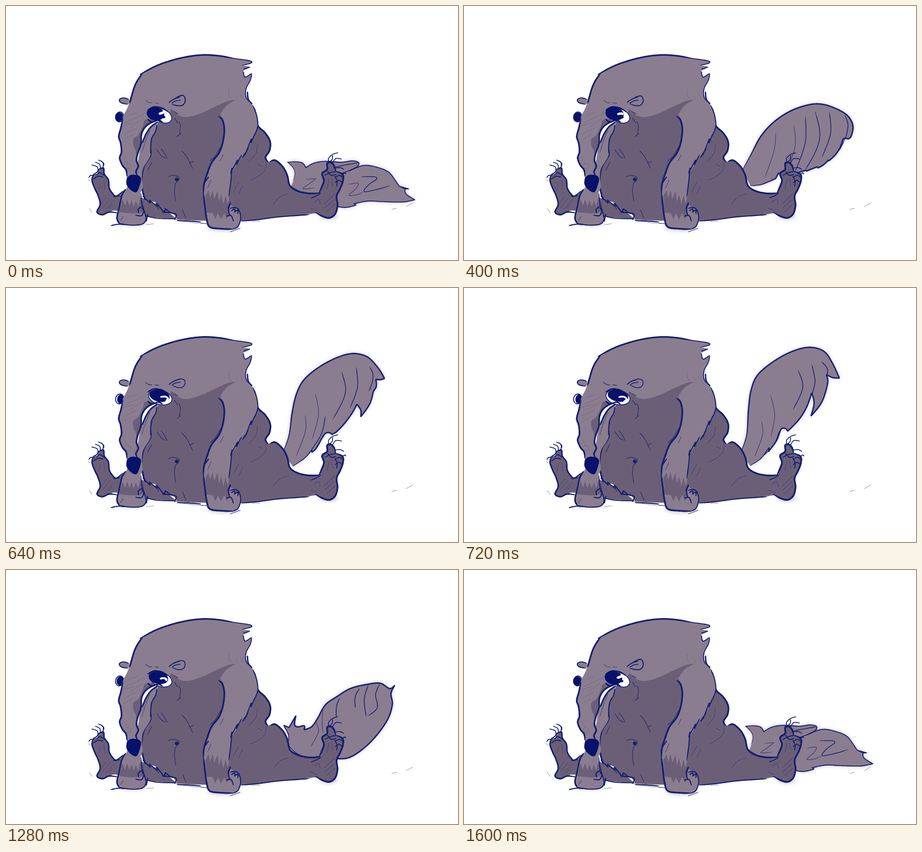
An HTML page with a canvas for the animation above (1.84 s loop, 998 by 561 pixels).

```html
<!DOCTYPE html>
<html lang="en">
<head>
<meta charset="utf-8">
<title>Tail swish</title>
<style>
html, body { margin: 0; width: 100%; height: 100%; overflow: hidden; background: #fff; }
canvas { display: block; width: 100%; height: 100%; }
</style>
</head>
<body>
<canvas id="stage" width="998" height="561"></canvas>
<script>
const ctx = document.getElementById('stage').getContext('2d');
const LIGHT = '#8b7d90', DARK = '#6b5f78', INK = '#14206f', NAVY = '#06126c', SOFT = '#4a4678';
const LOOP = 1840;
const mix = (a, b, t) => a + (b - a) * t;

// Smooth line through "x,y x,y ..."; a bar marks a sharp corner.
function trace(text) {
  const out = [];
  let last = null;
  for (const part of text.split('|')) {
    const p = part.trim().split(/\s+/).map(s => s.split(',').map(Number));
    if (last) p.unshift(last);
    for (let i = 0; i < p.length - 1; i++) {
      const a = p[i - 1] || p[i], b = p[i], c = p[i + 1], d = p[i + 2] || c;
      for (let k = 0; k < 8; k++) {
        const t = k / 8;
        out.push([0, 1].map(n => b[n] + 0.5 * t * (c[n] - a[n] +
          t * (2 * a[n] - 5 * b[n] + 4 * c[n] - d[n] + t * (3 * (b[n] - c[n]) + d[n] - a[n])))));
      }
    }
    last = p[p.length - 1];
  }
  out.push(last);
  return out;
}

// Evenly spaced points, so that two lines can be blended.
function resample(pts, count) {
  const len = [0];
  for (let i = 1; i < pts.length; i++)
    len.push(len[i - 1] + Math.hypot(pts[i][0] - pts[i - 1][0], pts[i][1] - pts[i - 1][1]));
  const out = [], total = len[len.length - 1];
  let j = 1;
  for (let i = 0; i < count; i++) {
    const want = total * i / (count - 1);
    while (j < pts.length - 1 && len[j] < want) j++;
    const t = (want - len[j - 1]) / (len[j] - len[j - 1] || 1);
    out.push([0, 1].map(n => mix(pts[j - 1][n], pts[j][n], t)));
  }
  return out;
}

const blend = (a, b, t) => a.map((p, i) => [mix(p[0], b[i][0], t), mix(p[1], b[i][1], t)]);

function fill(pts, color) {
  ctx.beginPath();
  pts.forEach(p => ctx.lineTo(p[0], p[1]));
  ctx.closePath();
  ctx.fillStyle = color;
  ctx.fill();
}

// Brush stroke, thin at both ends.
function brush(pts, width, color = INK) {
  ctx.strokeStyle = color;
  ctx.lineCap = 'round';
  for (let i = 1; i < pts.length; i++) {
    const swell = Math.min(1, 3 * Math.sin(Math.PI * i / pts.length));
    ctx.lineWidth = width * (0.4 + 0.6 * swell);
    ctx.beginPath();
    ctx.moveTo(...pts[i - 1]);
    ctx.lineTo(...pts[i]);
    ctx.stroke();
  }
}

function oval(x, y, rx, ry, turn, color, line) {
  ctx.beginPath();
  ctx.ellipse(x, y, rx, ry, turn, 0, 7);
  ctx.fillStyle = color;
  ctx.fill();
  if (!line) return;
  ctx.strokeStyle = INK;
  ctx.lineWidth = line;
  ctx.stroke();
}

const shape = (text, color) => fill(trace(text), color);
const strokes = (list, width, color) => list.forEach(s => brush(trace(s), width, color));

const makeTail = (edge, hairs, width = 2.8) => ({
  edge: resample(trace(edge), 240),
  hairs: hairs.map(h => resample(trace(h), 30)),
  width
});

const tails = {
  rest: makeTail(
    '635,385 638,368 633,356 622,345|640,344 655,347 662,357|680,347 705,343 740,345 765,342 779,346 775,355 758,364|790,352 822,357 845,367 858,383 868,398|889,404|881,405 884,416 903,428|875,433 830,432 798,431 768,437|772,440 750,445 732,443|690,426 655,413 630,398',
    ['663,383 685,381|668,394 655,404 680,402', '757,394 778,391 772,404 757,418 775,417 790,410', '785,377 813,377 819,382 803,393 790,410 820,405 847,397', '722,357 745,352 778,346', '735,372 757,364 770,358', '870,399 882,404 889,404'], 1.9),
  low: makeTail(
    '618,362 640,330 670,293 705,268 745,253 787,248 815,258 840,275 858,295 864,320 855,347|840,346|830,360 812,380 793,390|796,380|775,398 745,406|745,400 725,397 700,390|692,402|691,385|680,402|665,404 640,406 628,396',
    ['707,310 704,340 692,385', '760,304 762,340 751,387', '782,282 785,335 768,390', '800,270 815,305 817,340 795,388', '828,280 840,310 840,340', '850,282 861,310 856,335']),
  mid: makeTail(
    '612,362 628,325 642,283 665,245 700,210 740,188 772,177 810,180 840,190 856,212 851,241|838,235|837,258 825,285 805,309 788,317|790,310|765,325 738,347|735,340|715,343 700,347|692,367|687,364|665,381 650,386|637,397',
    ['670,250 665,300 637,372', '697,225 700,280 672,345', '726,207 722,270 694,343', '751,198 755,250 738,295 710,340', '786,190 780,255 742,325', '832,200 838,235 803,302']),
  high: makeTail(
    '610,366 624,325 628,270 634,225 650,190 690,158 730,138 765,131 795,140 813,165 829,199|814,198 800,191|803,210 790,252 766,283|773,255 768,231|757,262 740,290 715,316|710,310|700,312 690,337 672,362|674,352|655,377 632,392',
    ['657,295 659,325 642,372', '677,237 686,280 678,328', '696,317 685,345 662,370', '738,182 748,220 727,268', '768,170 775,205 768,237', '790,163 802,178 801,196']),
  flare: makeTail(
    '622,367 622,335 615,291|625,305|632,280 640,252 662,222 690,195 709,181|706,203 711,217|728,205 737,185 737,149|747,165 748,187 751,207|764,185 767,170 761,156 769,157 773,175 787,195|795,173 812,158 836,153|817,166 810,187 820,215 817,250 795,276 740,308 702,330 670,361 640,402',
    ['638,263 632,295 640,325', '655,250 658,285 656,320', '684,215 681,255 668,286', '657,226 653,250 655,277', '706,195 709,250 691,300', '751,205 740,250 721,278']),
  drop: makeTail(
    '622,385 624,365 613,343|625,348|640,322|637,342 645,347|659,344 658,353|675,346 689,326 705,298 730,280 760,262 795,253 826,250 847,262 858,255|850,273 853,298 840,335 805,380 765,411 735,417 700,412 665,414 640,404 624,388',
    ['684,335 690,357 673,390', '700,306 698,335 700,360', '737,283 730,300 729,325', '780,262 771,280 771,304', '800,254 791,285 795,323', '825,252 816,275 820,304 800,322'])
};

// start, tail, next tail, blend, eye squint
const poses = [
  [0, 'rest', 'rest', 0, 0],
  [240, 'low', 'low', 0, 0],
  [400, 'low', 'mid', 0.5, 0.25],
  [480, 'mid', 'mid', 0, 0.5],
  [560, 'mid', 'high', 0.35, 0.7],
  [640, 'mid', 'high', 0.7, 0.9],
  [720, 'high', 'high', 0, 1],
  [1120, 'flare', 'flare', 0, 1],
  [1200, 'flare', 'drop', 0.5, 1],
  [1280, 'drop', 'drop', 0, 0.65],
  [1440, 'rest', 'rest', 0, 0.3],
  [1600, 'rest', 'rest', 0, 0]
];

function drawTail(a, b, t) {
  const edge = blend(a.edge, b.edge, t);
  ctx.save();
  ctx.shadowColor = 'rgba(139,125,144,.7)';
  ctx.shadowBlur = 9;
  fill(edge, LIGHT);
  ctx.restore();
  brush(edge, a.width);
  a.hairs.forEach((h, i) => brush(blend(h, b.hairs[i], t), 1.5, i < 2 ? SOFT : INK));
}

function drawLegs() {
  shape('204,361 215,358 217,371 226,384 228,402 236,415 246,421 260,408|303,425 345,445 378,472|340,468 300,464 245,452 228,455 213,461 202,455 208,438 203,418 196,403 190,385 192,373 202,371', DARK);
  strokes(['204,361 215,358 217,371 226,384 228,402 236,415 244,420 258,409', '192,373 190,386 196,403 203,418 208,438 201,455 213,461 228,455 246,457'], 3);
  strokes(['200,373 207,368 217,374', '193,382 204,376 214,378', '204,362 200,368 193,372', '238,421 250,419', '306,463 335,469 372,470'], 2);
  strokes(['209,440 222,422', '213,446 230,425', '220,449 239,428', '209,390 205,405', '216,385 218,405', '226,448 235,438'], 1, SOFT);
  strokes(['203,364 201,355 189,351', '208,360 207,350 197,345', '214,358 214,346 204,340', '195,375 187,374 183,379', '215,354 216,348 210,342'], 1.6);
}

function drawBody() {
  shape('336,256 365,225 430,215 508,195 546,222 553,240 556,264 572,280 583,299 582,319 573,334 578,344|595,342 611,355 621,374 627,397 645,409 670,414 691,413|698,398 702,385 699,370 709,361 709,348 716,345 724,352 728,365 743,372 744,386 738,403 730,420 732,440 727,459 714,468 698,464 685,458 640,463 590,467 545,473|500,476 430,474 378,472|370,460 350,452 330,434 308,427 300,395 303,358 319,330 320,300 336,256', DARK);
  strokes(['553,240 556,264 572,280 583,299 582,319 573,334 578,344', '584,343 595,341 611,355 621,374 627,397 645,409 670,414 691,413',
    '691,413 698,398 702,385 698,370 709,361 709,348 716,345 724,352 728,365', '728,365 743,372 744,386 738,403 730,420 732,440 727,459 714,468 698,464 684,456',
    '322,292 318,310 319,330 304,356 299,390 304,418 308,428'], 3.6);
  strokes(['302,420 318,435|317,429|334,443|333,436|349,456|352,448|367,459', '345,455 365,457 376,461 372,472', '520,475 555,472 600,466 640,463 668,461', '378,474 405,475 430,477'], 2.4);
  strokes(['704,374 716,368 727,366', '727,378 736,374 743,378', '727,390 735,385 741,389', '726,376 731,387 730,398', '674,424 686,419 695,413', '710,365 718,374 728,372'], 1.8);
  strokes(['704,446 724,428', '703,437 726,415', '708,454 727,437', '680,434 690,427 694,438', '713,383 709,403', '719,381 721,398', '590,438 606,421 624,415',
    '574,345 572,362 557,376 539,385', '555,305 552,325 536,344', '514,389 502,411', '522,397 514,415', '556,350 566,354', '672,446 686,452'], 1.3, SOFT);
  strokes(['333,317 343,331 352,336', '342,315 350,325 356,337', '388,320 399,333 412,359', '405,347 414,343', '358,377 370,374 383,380 374,392', '374,391 372,410 375,431',
    '382,256 385,265 383,283', '372,248 379,258', '378,288 386,282', '322,345 313,363', '390,451 397,468', '331,436 337,449', '450,342 462,331 475,309'], 1.5, '#343567');
  oval(377, 383, 4, 4, 0.5, INK);
  strokes(['714,348 712,337 721,328 733,324', '721,347 728,337 741,338', '727,358 738,357 746,361', '741,372 748,369 750,371', '712,346 720,339 721,330'], 1.6);
}

function drawFarArm() {
  shape('335,256 318,269 303,296 296,315 289,350 265,405 256,418 250,445 245,468 250,480 275,484 300,482 309,471 305,452 299,437 297,414 302,400 300,380 303,358 319,330 320,302 335,256', LIGHT);
  shape('257,427|263,441|267,427|273,442|277,429|282,443|287,430|292,443|296,426|300,430|302,455|288,458 265,457 250,455|257,427', DARK);
  strokes(['264,405 256,418 250,445 245,468 250,480', '335,256 320,267 309,283 301,302'], 3.2);
  strokes(['333,263 330,277 321,295 319,325', '250,480 275,484 300,482 309,471 305,452 300,437 298,414', '286,462 299,463 304,453 300,446', '293,457 292,449 301,442', '232,485 248,482 263,483', '313,460 310,475'], 2.2);
  strokes(['318,274 309,295 300,324', '302,432 304,445', '259,465 253,474'], 1.2, SOFT);
}

function drawHead(k) {
  shape('252,206 264,203 272,207|270,217 256,216 251,210', LIGHT);
  strokes(['271,206 260,203 251,206 253,213 268,217'], 2);
  oval(251, 245, 9, 11, 0.2, '#fff', 2);
  oval(mix(250, 253, k), 245, mix(9, 7, k), 10, 0.2, NAVY);

  shape('301,149 330,133 363,121 400,112 437,108 470,110 505,116 535,119|541,125 522,131|538,135 524,143|527,157|543,149|539,165 531,180 529,196 536,212 548,223|525,226 508,207|490,210 460,223 430,237 400,245 380,241 365,229|350,250 333,254|318,259 306,269 299,284 297,306 290,325 288,340 292,355 287,367 291,376|280,384 267,378|265,362 256,352 251,335 255,322 253,302 249,288 252,270 258,245 268,225 277,200 284,178 301,149', LIGHT);
  shape('326,250 307,252 302,265 292,285 281,294 282,310 287,322 289,352|291,325 297,306 299,284 306,268 326,254', DARK);
  strokes(['296,151 330,133 363,121 400,112 437,108 470,110 500,115', '301,149 290,165 283,180 277,200 273,214',
    '258,248 254,268 249,288 253,302 255,322 251,336 257,352 265,362 267,376', '334,253 318,259 306,269 299,284 298,304 291,325 288,341 292,354 287,366 291,376'], 3.4);
  strokes(['480,112 505,116 538,121 541,126 522,131', '538,135 525,139', '524,145 528,157 542,149', '543,150 539,165 531,180 529,196 535,211 547,222'], 1.9);
  strokes(['533,190 535,206 543,216'], 3);
  strokes(['274,270 285,261 301,251', '262,282 288,270', '265,257 286,248 310,235', '260,264 283,257', '270,242 290,235', '262,295 280,284', '493,184 493,198 500,206', '507,198 517,212', '518,194 525,211',
    '262,352 268,348 276,352 272,359 264,357', '258,332 267,345'], 0.9, '#716787');
  strokes(['308,208 315,213 322,214', '329,214 337,215'], mix(1.1, 2, k), SOFT);
  strokes(['360,213 370,206 384,201'], 2);
  const ear = resample(trace('372,205 383,199 392,198 396,209 390,219 378,220 366,217'), 40);
  const folded = resample(trace('376,205 384,201 394,204 395,212 390,219 380,220 368,215'), 40);
  brush(blend(ear, folded, k), mix(2.1, 1.5, k));
  strokes(['366,215 374,210 385,208'], 1.6);
  strokes(['365,229 378,239', '372,233 380,238'], 1.3, SOFT);

  shape('267,379 276,373 291,374 298,381 295,397 288,411 276,407 266,394 267,379', NAVY);
}

function drawEye(k) {
  oval(mix(347, 340, k), mix(243, 241.5, k), mix(20, 27, k), mix(14, 16, k), mix(0.5, 0.22, k), '#fff', 1.8);
  oval(mix(330, 340, k), mix(238, 238, k), mix(19.5, 23, k), mix(15, 13, k), 0.2, NAVY);
  const glint = resample(trace('339,238 345,236 349,234'), 20);
  const streak = resample(trace('342,241 352,240 359,245 353,251'), 20);
  brush(blend(glint, streak, k), mix(5, 3.5, k), '#fff');
  oval(mix(347, 350, k), mix(245, 246, k), mix(5, 4, k), 3, 0.2, NAVY);
  strokes(['313,230 326,223 344,225 357,233'], 2.4, NAVY);
  strokes(['313,250 322,256 336,252 345,256'], 2.6, NAVY);
}

function drawNearArm() {
  shape('508,207 487,220 473,239|479,251 483,272 479,300 470,325 454,346 444,371 437,395 436,415 439,440 443,470 450,488 475,492 501,493 512,487 518,470 515,452 506,445 495,437 492,420 496,390 498,368|510,350 525,325|532,319 545,293 556,265 553,240 546,222 530,205', LIGHT);
  shape('440,420|447,407|451,424|456,406|460,426|467,408|470,432|475,416|480,438|485,417|489,437|494,422|494,462|487,470|482,457|475,471|468,458|462,471|457,458|443,456|440,420', DARK);
  strokes(['470,244 478,252 482,272 479,300 470,325 454,346 444,371 437,395 436,415', '436,415 439,440 443,470 450,488 475,492 501,493'], 3.6);
  strokes(['438,391 447,378', '446,369 448,357', '501,493 512,487 518,470 515,452 506,445 495,447', '487,464 497,463 502,475', '494,462 491,449 496,436', '498,452 505,448 505,456', '506,454 512,451 512,459', '492,420 496,390 498,368 499,358|496,370',
    '546,222 553,240 556,265 548,287', '549,283 541,302|541,295 528,329', '534,316 523,334', '520,329 509,350|511,341 499,363', '495,435 490,447'], 2.2);
  strokes(['453,384 445,402', '480,328 473,342', '430,480 445,481', '495,499 517,491'], 1.2, SOFT);
}

function drawGround() {
  strokes(['181,383 186,387', '184,447 190,456', '388,475 414,479 440,480', '310,483 326,481', '544,476 561,475', '852,449 862,447', '884,443 898,435', '667,461 679,457'], 1, '#9290ab');
  ctx.save();
  ctx.filter = 'blur(4px)';
  oval(480, 488, 36, 8, 0, '#c9c2cf');
  oval(278, 480, 32, 5, 0, '#c9c2cf');
  oval(712, 464, 20, 7, 0, '#c9c2cf');
  ctx.restore();
}

function draw([, from, to, t, squint]) {
  ctx.fillStyle = '#fff';
  ctx.fillRect(0, 0, 998, 561);
  drawGround();
  drawTail(tails[from], tails[to], t);
  drawLegs();
  drawBody();
  drawFarArm();
  drawHead(squint);
  drawEye(squint);
  drawNearArm();
}

let shown = null;
function tick() {
  const now = performance.now() % LOOP;
  const pose = poses.filter(p => p[0] <= now).pop();
  if (pose !== shown) draw(shown = pose);
  requestAnimationFrame(tick);
}
tick();
</script>
</body>
</html>
```
